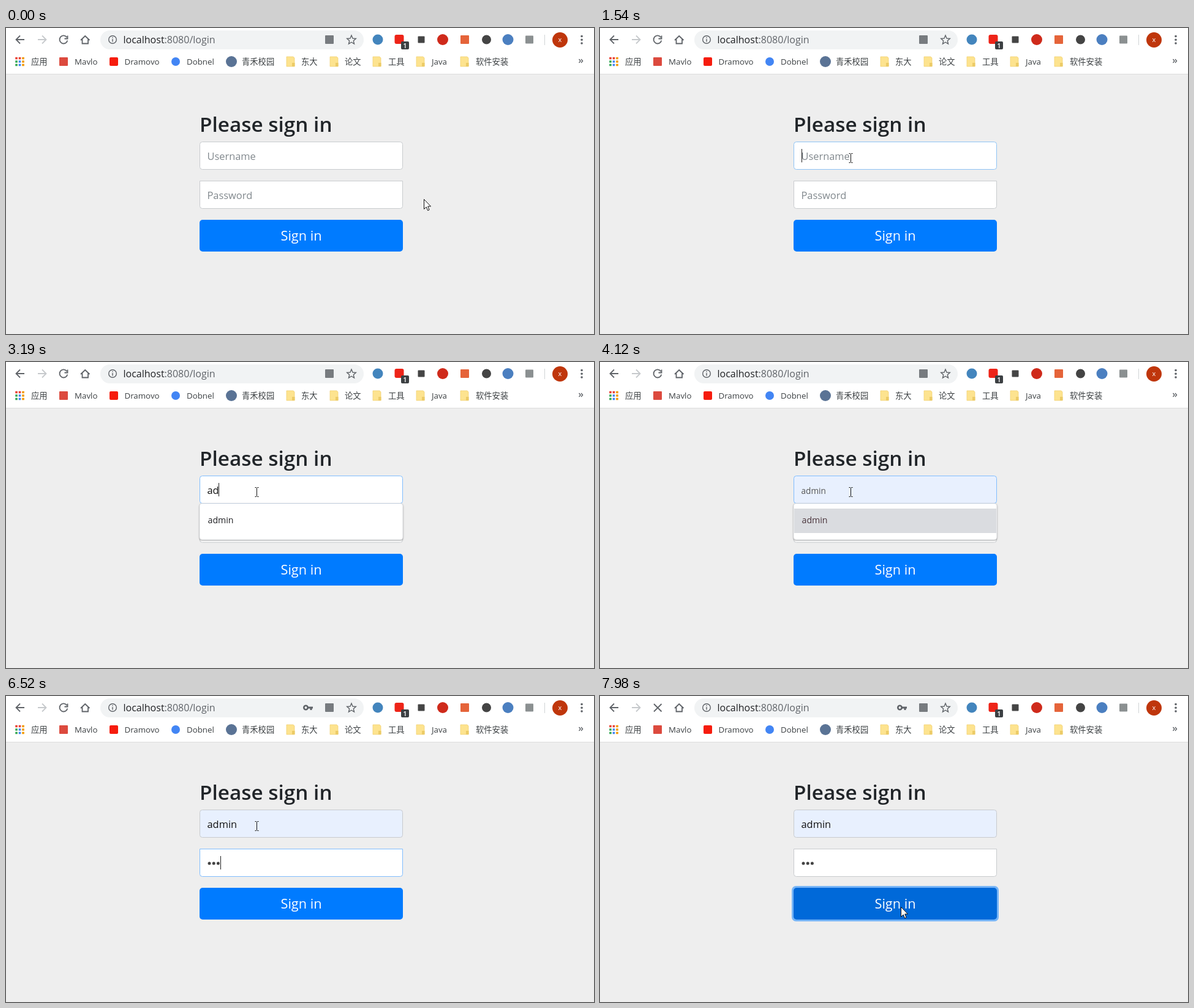
Recreate the animation shown at these times as an HTML page. Size 960x501 px, loop 8 s.

```html
<!DOCTYPE html>
<html lang="en">
<head>
<meta charset="utf-8">
<title>Sign in</title>
<style>
  html, body { margin: 0; width: 100%; height: 100%; overflow: hidden; background: #eee; }
  svg { display: block; font-family: "Open Sans", "Noto Sans CJK SC", "Noto Sans CJK", "Noto Sans", sans-serif; }
  .line { fill: none; stroke: #5f6368; stroke-width: 1.8; }
  .thin { stroke-width: 1.4; }
  .mark { font-size: 13.3px; fill: #3c4043; }
  .field { font-size: 16.4px; fill: #111; }
  .hint { fill: #81888d; }
  .item { font-size: 14.2px; fill: #202124; }
</style>
</head>
<body>
<svg id="stage" width="960" height="501" viewBox="0 0 960 501">
  <defs>
    <filter id="shade" x="-5%" y="-10%" width="110%" height="130%">
      <feDropShadow dx="0" dy="1" stdDeviation="1" flood-opacity=".4"/>
    </filter>
  </defs>
  <rect width="960" height="501" fill="#eee"/>
  <rect width="960" height="75" fill="#fff"/>
  <rect y="75" width="960" height="1" fill="#dcdcdc"/>
  <rect x="154" y="4" width="430" height="31" rx="15.5" fill="#f1f3f4"/>

  <g class="line">
    <path d="M30 19H17M23 12.5L16.5 19L23 25.5"/>
    <path stroke="#c6c9cc" d="M52 19H65M59 12.5L65.5 19L59 25.5"/>
    <path id="reload" d="M99.3 15.2A6.5 6.5 0 1 0 100.3 20.5M100.5 12.5V17.5H95.5"/>
    <path id="stop" d="M88 13L100.5 25.5M100.5 13L88 25.5"/>
    <path d="M122 20L129.2 13L136.5 20M124.5 18.5V25.5H134V18.5"/>
    <circle class="thin" cx="174" cy="19" r="6.3"/>
    <path class="thin" d="M174 18V22.5M174 15V16.6"/>
    <path class="thin" d="M564 12L566.1 17L571.3 17.4L567.3 20.9L568.5 26L564 23.2L559.5 26L560.7 20.9L556.7 17.4L561.9 17Z"/>
    <path class="thin" d="M935.5 51L938 54L935.5 57M939 51L941.5 54L939 57"/>
  </g>
  <g id="key">
    <circle cx="489.5" cy="19" r="3.2" fill="none" stroke="#5f6368" stroke-width="2.6"/>
    <path d="M493 17.5H501V20.5H499.5V23H496.5V20.5H493Z" fill="#5f6368"/>
  </g>
  <text x="191.5" y="25" font-size="16" fill="#5f6368"><tspan fill="#202124">localhost</tspan>:8080/login</text>

  <g id="tools">
    <rect x="645" y="22" width="13" height="13" rx="2" fill="#3c4043"/>
    <text x="651.5" y="32.5" font-size="11" font-weight="600" fill="#fff" text-anchor="middle">1</text>
    <rect x="879" y="11" width="1" height="17" fill="#d0d3d6"/>
    <circle cx="904.5" cy="19.5" r="12.5" fill="#bf360c"/>
    <text x="904.5" y="23" font-size="11" fill="#fff" text-anchor="middle">x</text>
    <g fill="#5f6368"><circle cx="940" cy="13.5" r="1.8"/><circle cx="940" cy="19.3" r="1.8"/><circle cx="940" cy="25" r="1.8"/></g>
  </g>
  <g id="marks"></g>

  <text x="316" y="170" font-size="33.3" font-weight="600" fill="#212529">Please sign in</text>
  <rect id="userBox" x="316.5" y="186.5" width="331" height="45" rx="4"/>
  <path id="passBox" d="M316.5 250.5H647.5V291.5A4 4 0 0 1 643.5 295.5H320.5A4 4 0 0 1 316.5 291.5Z" fill="#fff"/>
  <text id="user" class="field" x="328.5" y="216"></text>
  <text id="passHint" class="field hint" x="328.5" y="280">Password</text>
  <g id="dots" fill="#444"></g>
  <rect id="caret" width="1" height="22" fill="#222"/>
  <rect id="ring" x="313" y="311" width="338" height="58" rx="7" fill="#77b5f7"/>
  <rect id="button" x="316" y="314" width="332" height="52" rx="5"/>
  <text x="482" y="348" font-size="21.7" fill="#fff" text-anchor="middle">Sign in</text>

  <g id="list">
    <rect id="panel" x="316" y="231.5" width="332" rx="4" fill="#fff" stroke="#c4c6c9" stroke-width=".6" filter="url(#shade)"/>
    <rect id="pick" x="317" y="240" width="330" height="40" fill="#dadce0"/>
    <g id="items"></g>
  </g>
  <g id="tip">
    <rect x="417.5" y="225.5" width="107" height="25" fill="#fff" stroke="#8a8a8a" stroke-width=".8" filter="url(#shade)"/>
    <text x="425" y="243" font-size="13" fill="#575757">请填写此字段。</text>
  </g>
  <path id="arrow" d="M.5 .5V16.5L4.2 13L6.6 18.8L9.1 17.7L6.7 12H11.5Z" fill="#fff" stroke="#111" stroke-linejoin="round"/>
  <path id="beam" d="M-2.5 -7.5H-.5L.5 -6.5L1.5 -7.5H3.5M.5 -6.5V6.5M-2.5 7.5H-.5L.5 6.5L1.5 7.5H3.5" fill="none" stroke="#111"/>
</svg>
<script>
const LOOP = 8000;
const $ = id => document.getElementById(id);

function add(parent, tag, attrs, text) {
  const el = document.createElementNS("http://www.w3.org/2000/svg", tag);
  for (const k in attrs) el.setAttribute(k, attrs[k]);
  if (text) el.textContent = text;
  $(parent).append(el);
  return el;
}
const disc = (parent, cx, cy, r, fill) => add(parent, "circle", { cx, cy, r, fill });
const box = (parent, cx, cy, size, fill, rx = 1) =>
  add(parent, "rect", { x: cx - size / 2, y: cy - size / 2, width: size, height: size, rx, fill });
const show = (id, on) => $(id).setAttribute("display", on ? "inline" : "none");

// Toolbar shapes; the badge stays on top of the red square
const badge = $("tools").firstElementChild;
badge.before(box("tools", 642, 18.5, 15, "#ee2418", 3));
box("tools", 528, 19, 14, "#777b7f");
disc("tools", 607, 19, 8.5, "#4385bd");
box("tools", 678, 19, 11, "#454545");
disc("tools", 713, 19, 9, "#cf2a1b");
box("tools", 749, 19, 14, "#e5643a");
disc("tools", 784.5, 19, 7.5, "#444");
disc("tools", 819.5, 19, 9, "#4b7fc0");
box("tools", 854.5, 19, 13, "#8b9091");

// Bookmarks bar
const dotColors = ["#ea4335", "#ea4335", "#f29900", "#34a853", "#4285f4", "#f29900", "#34a853", "#4285f4", "#f29900"];
dotColors.forEach((c, i) => box("marks", 17 + i % 3 * 5.5, 49.5 + (i / 3 | 0) * 5.5, 3.6, c, .5));
box("marks", 94, 55, 14, "#dc4a3e");
box("marks", 176, 55, 14, "#f61c0d", 2);
disc("marks", 277, 55, 7, "#4285f4");
disc("marks", 368, 55, 9, "#5a7395");
for (const x of [458, 529, 599, 670, 742]) {
  add("marks", "path", { d: `M${x} 47H${x + 11}L${x + 13} 49V63H${x}Z`, fill: "#fde38f", stroke: "#efcd6b", "stroke-width": .7 });
  add("marks", "rect", { x: x + 9, y: 57, width: 4.5, height: 6, fill: "#eccb67" });
}
[[41, "应用"], [112, "Mavlo"], [193.5, "Dramovo"], [295, "Dobnel"], [385, "青禾校园"], [482, "东大"],
 [553, "论文"], [624, "工具"], [695, "Java"], [767, "软件安装"]]
  .forEach(([x, name]) => add("marks", "text", { x, y: 60, class: "mark" }, name));

const names = ["user", "admin", "root", "linhua", "peiruyi", "guest"];
const rows = names.map((n, i) => add("items", "text", { x: 329.5, y: 264 + i * 39.8, class: "item" }, n));
const dots = [0, 1, 2].map(i => disc("dots", 332 + i * 7.2, 274, 2.5, "#444"));

// Each track holds [start, value...] steps
const evenly = (from, gap, points) => points.map((p, i) => [from + gap * i, ...p]);
const pointer = [
  [0, 682, 280],
  ...evenly(110, 72, [[700, 284], [722, 286], [738, 286], [735, 283], [705, 277], [650, 262],
    [580, 243], [510, 228], [450, 219], [410, 217], [398, 217]]),
  ...evenly(920, 70, [[396, 216], [403, 214], [409, 213]]),
  ...evenly(7380, 73.3, [[415, 234], [430, 258], [449, 298], [468, 322], [480, 336], [488, 342], [491, 345]])
];
const caret = [[0], [1380, 329, 198], [1930], [2480, 329, 198], [2930], [3130, 338, 198], [3190, 347, 198],
  [3730], [4430, 378, 198], [4730, 329, 262], [5210, 335, 262], [5840], [6210, 335, 262], [6290, 342, 262],
  [6520, 350, 262], [7070], [7600, 350, 262], [7900]];
const typed = [[0, ""], [3130, "a"], [3190, "ad"], [4120, "admin"]];
const secret = [[0, 0], [5210, 1], [6060, 0], [6210, 1], [6290, 2], [6520, 3]];
const list = [[0, "none"], [1620, "all"], [3130, "one"], [4040, "picked"], [4430, "none"]];
const userEdge = [[0, "#c8cbce"], [1540, "#8fc3f5"], [1620, "#80bdff"], [4730, "#a5c4e6"], [4810, "#c8cbce"]];
const passEdge = [[0, "#c8cbce"], [4730, "#a5c4e6"], [4810, "#80bdff"], [7900, "#a5c4e6"], [7980, "#c8cbce"]];
const buttonFill = [[0, "#007bff"], [7670, "#0073ee"], [7750, "#0069d9"]];
const ringAlpha = [[0, 0], [7900, .5], [7980, 1]];

function at(track, t) {
  let step = track[0];
  for (const s of track) if (s[0] <= t) step = s;
  return step.slice(1);
}
const within = (t, a, b) => t >= a && t < b;

function draw(t) {
  const [px, py] = at(pointer, t);
  const overField = px > 316 && px < 648 && (within(py, 186, 232) || within(py, 250, 296));
  show("arrow", !overField);
  show("beam", overField);
  $(overField ? "beam" : "arrow").setAttribute("transform", `translate(${px} ${py})`);

  const [cx, cy] = at(caret, t);
  show("caret", cx !== undefined);
  if (cx) { $("caret").setAttribute("x", cx); $("caret").setAttribute("y", cy); }

  const [name] = at(typed, t), preview = within(t, 4120, 4430), user = $("user");
  user.textContent = name || "Username";
  user.setAttribute("class", name ? "field" : "field hint");
  user.style.fontSize = preview ? "13.6px" : "";
  user.style.fill = preview ? "#555" : "";

  const [count] = at(secret, t);
  show("passHint", !count);
  dots.forEach((d, i) => d.setAttribute("display", i < count ? "inline" : "none"));
  show("key", within(t, 5270, 6060) || t >= 6290);

  const [mode] = at(list, t);
  show("list", mode !== "none");
  show("pick", mode === "picked");
  $("panel").setAttribute("height", mode === "all" ? 257 : 59.5);
  rows.forEach((r, i) => {
    r.textContent = mode === "all" ? names[i] : i ? "" : "admin";
  });
  rows[0].style.fill = mode === "picked" ? "#4a343b" : "";

  $("userBox").setAttribute("stroke", at(userEdge, t)[0]);
  $("userBox").setAttribute("fill", t < 4120 ? "#fff" : "#e8f0fe");
  $("passBox").setAttribute("stroke", at(passEdge, t)[0]);
  $("button").setAttribute("fill", at(buttonFill, t)[0]);
  $("ring").setAttribute("opacity", at(ringAlpha, t)[0]);
  show("tip", within(t, 1230, 1380));
  show("reload", t < 7980);
  show("stop", t >= 7980);
}

const start = performance.now();
function tick() {
  draw((performance.now() - start) % LOOP);
  requestAnimationFrame(tick);
}
tick();
</script>
</body>
</html>
```
